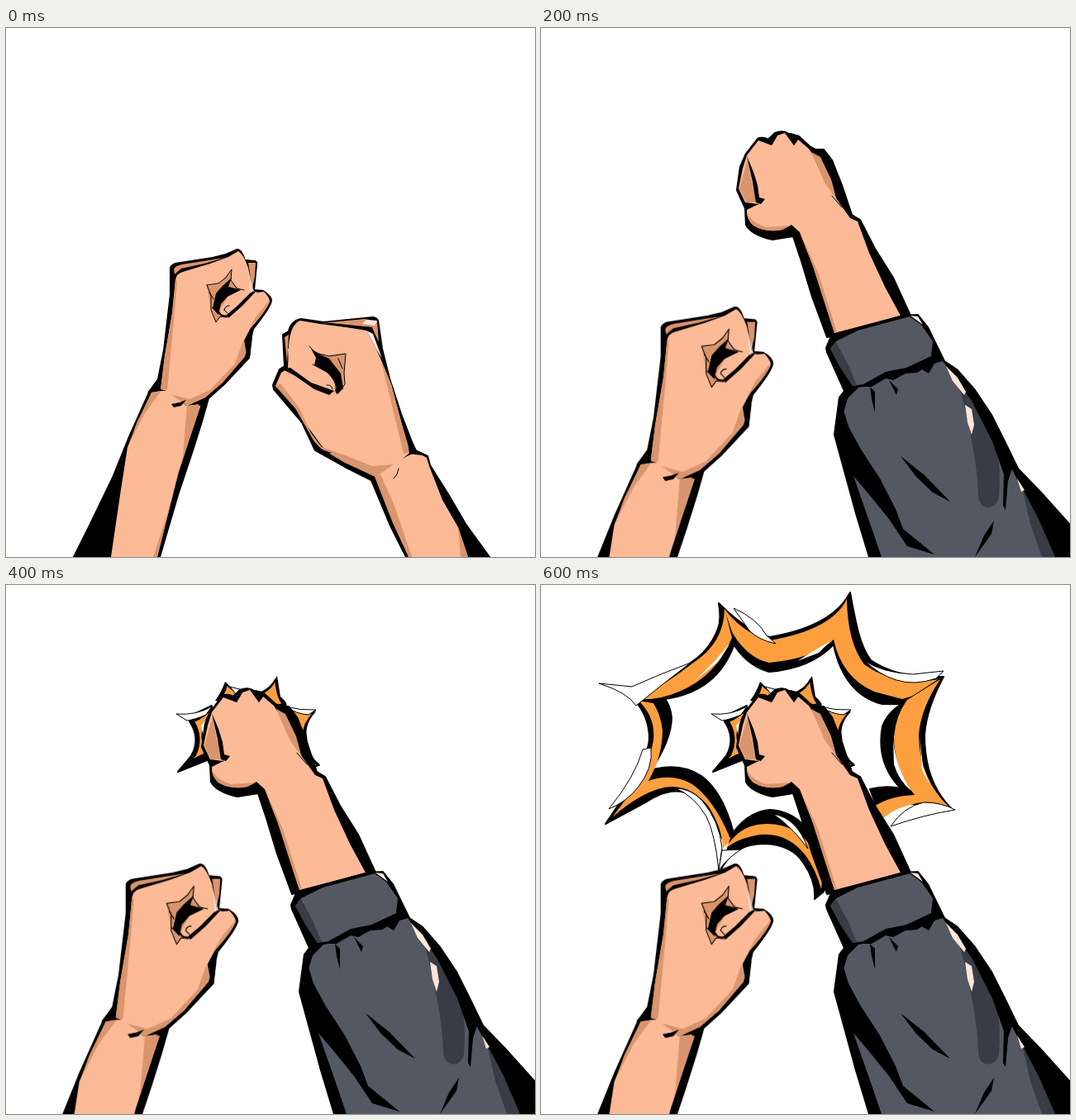
Animation, 640 px wide and 640 px high, one loop 800 ms. Source, as an HTML page:

```html
<!DOCTYPE html>
<html lang="en">
<head>
<meta charset="utf-8">
<title>Punch</title>
<style>
  html, body { margin: 0; width: 100%; height: 100%; overflow: hidden; background: #fff; }
  svg { display: block; width: 100%; height: 100%; }
  .skin { fill: #fdba97; }
  .shade { fill: #d9956d; }
  .cloth { fill: #545863; }
  .dark { fill: #393c45; }
  .shine { fill: #fee6d8; }
  .fire { fill: #fd9f3f; }
  .ink { fill: #000; }
  .body { stroke: #000; stroke-width: 2; stroke-linejoin: round; }
  .line { fill: none; stroke: #000; stroke-width: 2; stroke-linecap: round; stroke-linejoin: round; }
  .thin { stroke-width: 1; }
  .white { fill: #fff; stroke: #000; stroke-width: 1; stroke-linejoin: round; }
  .glint { fill: #fff; }
  #spark .fire { stroke: #000; stroke-width: 2; }
  #left, #guard, #punch, #spark, #blast { animation: 800ms step-end infinite; }
  #left { transform-origin: 0 0; animation-name: drop; }
  #guard { animation-name: guard; }
  #punch { animation-name: punch; }
  #spark { animation-name: spark; }
  #blast { animation-name: blast; }
  @keyframes drop {
    0% { transform: none; }
    25%, 100% { transform: matrix(1.1, 0, 0, 1.1, -73, 43); }
  }
  @keyframes guard { 0% { visibility: visible; } 25%, 100% { visibility: hidden; } }
  @keyframes punch { 0% { visibility: hidden; } 25%, 100% { visibility: visible; } }
  @keyframes spark { 0% { visibility: hidden; } 50%, 100% { visibility: visible; } }
  @keyframes blast { 0% { visibility: hidden; } 75%, 100% { visibility: visible; } }
</style>
</head>
<body>
<svg viewBox="0 0 640 640">

  <g id="blast">
    <!-- top -->
    <path class="ink body" d="M215 22Q220 50 208 70Q199 86 186 95L234 73Q250 98 276 105Q326 101 354 72C362 112 383 137 413 144L437 144L487 111Q433 114 399 91C386 74 381 48 374 9Q353 50 277 63Q250 57 215 22Z"/>
    <path class="fire" d="M370 17Q352 54 277 67Q246 60 221 28Q228 47 231 57Q249 88 276 94Q330 89 354 66Q364 112 403 129L437 138Q459 133 482 114Q428 123 391 96Q371 70 370 17Z"/>
    <path class="white" d="M233 28Q262 41 272 60L284 71Q262 66 252 55Z"/>
    <path class="glint" d="M350 68L336 82L310 92L336 76Z"/>
    <path class="white" d="M392 92Q413 106 450 108L487 104L478 113Q452 122 430 115Q408 108 392 92Z"/>
    <!-- right -->
    <path class="ink body" d="M487 111Q466 150 464 182Q464 238 496 270L440 264L405 266L398 247Q418 242 435 246Q405 215 413 171Q419 154 439 142Z"/>
    <path class="fire" d="M483 114Q459 150 457 182Q458 235 494 269Q470 258 447 266Q420 272 408 290L403 268Q422 255 452 254Q427 224 427 184Q429 158 443 139Z"/>
    <path class="glint" d="M426 187Q429 221 448 249Q433 237 427 217Z"/>
    <path class="glint" d="M458 180L462 220L471 242L461 224Z"/>
    <path class="white" d="M423 292Q439 268 463 263Q485 263 501 272Q463 278 423 292Z"/>
    <!-- left -->
    <path class="ink body" d="M220 27Q215 72 181 94Q147 123 113 139Q131 159 131 186Q130 214 78 289L128 262Q165 238 190 260L222 311L233 300Q220 250 194 231Q168 214 133 224Q158 187 158 160Q156 145 150 138Q214 129 234 71Z"/>
    <path class="fire" d="M222 28Q222 70 183 95Q150 121 115 138Q142 140 167 129Q211 111 231 64Z"/>
    <path class="fire" d="M118 140Q139 160 136 188Q129 228 86 281Q116 255 141 247Q176 236 202 267Q219 293 220 318L230 309Q210 260 183 241Q159 227 130 237Q147 207 147 176Q145 157 136 143Z"/>
    <path class="white" d="M70 119L110 123Q143 108 181 94Q148 119 115 146Q105 130 70 119Z"/>
    <path class="glint" d="M229 70L215 92L186 116L211 91Z"/>
    <path class="white" d="M82 271Q114 232 123 199L133 197Q136 222 117 245Q104 262 82 271Z"/>
    <path class="white" d="M163 246Q185 255 200 280Q211 302 215 346L219 318Q216 286 195 261Q181 246 163 246Z"/>
    <!-- bottom -->
    <path class="ink body" d="M218 344Q234 313 270 313Q304 314 318 337Q333 359 331 380L342 371L342 330Q320 274 277 272Q251 274 232 300Z"/>
    <path class="fire" d="M223 319Q241 289 272 289Q309 288 330 321Q343 344 339 368Q333 345 320 327Q298 299 265 302Q236 307 223 319Z"/>
    <path class="white" d="M215 345L219 321L242 320Q226 330 215 345Z"/>
    <path class="white" d="M281 277Q310 282 323 319Q304 293 281 277Z"/>
  </g>

  <g id="spark">
    <path class="ink body" d="M249 146L224 158L222 165Q236 186 224 207L208 226L243 212Z"/>
    <path class="fire" d="M248 151Q239 160 227 165Q239 185 229 206L215 221Q225 210 242 204L238 189Q235 174 248 153Z"/>
    <path class="white" d="M206 156Q230 158 249 147L242 157Q228 163 219 164Z"/>
    <path class="glint" d="M247 158L241 166L239 184L236 170Z"/>
    <path class="ink" d="M265 117Q261 129 253 140L281 144L285 132Q274 127 265 117Z"/>
    <path class="fire" d="M267 120Q265 130 260 137L279 137L283 131Q273 128 267 120Z"/>
    <path class="white" d="M271 123L290 128L279 133Z"/>
    <path class="ink" d="M328 110Q320 125 306 130L329 151Q349 150 332 135Z"/>
    <path class="fire" d="M326 114Q321 126 309 131L327 146L335 144Q328 136 326 114Z"/>
    <path class="ink" d="M331 145Q354 155 375 152Q361 169 364 183Q366 208 380 217L370 224Z"/>
    <path class="fire" d="M343 150Q361 157 372 155Q359 169 360 182L354 174ZM365 196L371 213L378 218L371 220Z"/>
    <path class="white" d="M338 147Q356 152 375 151L366 157Q351 156 338 147Z"/>
  </g>

  <g id="left">
    <path class="ink body" d="M82 640L101 602L129 544L148 497L173 441L184 425L191 390L199 322L199 290Q200 287 205 285L250 278L266 274L280 268Q285 268 289 281L301 282Q304 283 303 287L300 317L311 318Q321 324 321 330Q320 338 299 364L296 377L294 399L264 431L245 448L237 476L226 511L208 565L186 640Z"/>
    <path class="shade" d="M203 292Q204 288 213 286L264 278L240 285L212 291L204 298ZM293 284L302 284L301 301L298 314Z"/>
    <path class="skin" d="M176 441L194 438L218 457L236 455L221 500L208 540L183 640L127 640L138 565L147 507Z"/>
    <path class="shade" d="M176 441L188 439L168 466L148 505L158 478ZM219 457L236 455L221 500L208 540L183 640L178 640L200 573L214 518Z"/>
    <path class="skin" d="M205 305Q206 297 214 295L247 285L269 277L281 270Q287 273 293 290L298 317L304 320L312 319Q319 326 319 331Q317 339 296 363L288 378L291 395L262 429L241 447L219 457L191 440L187 438L192 397L201 345Z"/>
    <path class="shade" d="M205 304L207 306L203 354L195 438L187 437L192 397L201 345ZM287 378L291 395L262 429L241 447L219 457L199 443L222 449L247 438L277 406ZM319 329Q317 340 296 363L288 376L302 350Z"/>
    <path class="ink" d="M289 379L298 374L295 399L287 404L291 391ZM171 441L184 424L187 437L194 439L182 439Z"/>
    <path class="shade" d="M243 312L257 310L273 293L272 306L284 317L269 324L260 339L262 348L254 355L248 340Z"/>
    <path class="ink" d="M254 321L262 312L273 302L269 313L284 317L268 325L260 334L257 347L250 339Z"/>
    <path class="line thin" d="M243 311L257 309L266 302L273 292L272 305L279 315L288 317M243 311L248 323L248 341L254 356L259 349L267 350M246 320L251 328M249 338L257 346"/>
    <path class="skin" d="M299 316L284 319Q263 329 258 344Q262 351 271 347L297 323Z"/>
    <path class="line" d="M258 344Q260 350 270 348"/>
    <path class="line thin" d="M264 341Q265 336 270 336M264 341L268 345"/>
    <path class="ink" d="M267 347L280 336L298 318L302 319L286 336L269 351Z"/>
    <path class="glint" d="M294 294L300 318L296 321Z" opacity=".6"/>
    <path class="ink" d="M200 455L210 453L218 450L212 457L203 459ZM232 456L244 448L239 458Z"/>
  </g>

  <g id="guard">
    <path class="ink body" d="M323 432L331 413L337 409L335 371L342 367Q345 354 357 352L384 356L444 350Q449 351 450 354L455 388L464 424L478 467L495 511L510 518L513 529L535 564L556 600L585 640L484 640L465 602L442 547L410 531L374 511L358 477L324 437Z"/>
    <path class="shade" d="M337 374L342 371L340 405ZM381 357L434 352L449 355L451 380L443 363L400 358Z"/>
    <path class="skin" d="M447 542L485 518L497 513L509 520L512 530L528 571L547 604L559 640L491 640L472 602Z"/>
    <path class="shade" d="M446 543L453 540L470 578L491 640L487 640L468 599ZM547 604L559 640L550 640Z"/>
    <path class="skin" d="M342 385Q344 358 356 354L380 358L436 365L446 382L456 407L466 431L478 476L488 514L478 523L447 543L414 527L386 511L367 485L350 460L326 433L333 417L341 412Z"/>
    <path class="shade" d="M326 433L332 430L355 460L369 490L382 507L410 517L443 530L469 528L447 543L410 526L376 506L350 460ZM453 400L466 431L478 476L489 513L481 515L470 469Z"/>
    <path class="ink" d="M356 472L369 496L382 510L394 514L385 516L373 510ZM484 485L497 511L511 518L488 515Z"/>
    <path class="ink" d="M383 356L443 362L453 389L457 407L436 366L400 360Z"/>
    <path class="shine" d="M436 353L449 354L446 360L431 358ZM436 366L444 370L455 400L448 389Z"/>
    <path class="shade" d="M371 391L389 397L411 394L408 438L397 441Z"/>
    <path class="ink" d="M369 388L382 396L391 400L405 418L408 436L400 443L390 418L373 408L375 399Z"/>
    <path class="line thin" d="M367 385L374 393L391 397L411 394L409 417L410 431L402 442M402 400L407 412"/>
    <path class="skin" d="M341 388L366 386L373 408L389 417Q402 430 399 438Q393 442 382 437L343 412Z"/>
    <path class="line thin" d="M371 407L388 416Q401 428 399 438M388 432Q394 431 395 437"/>
    <path class="ink" d="M333 412L344 411L369 429L397 439L391 444L373 437L350 421Z"/>
    <path class="line thin" d="M475 533L473 540L469 545"/>
  </g>

  <g id="punch">
    <path class="ink body" d="M237 196L241 168L248 152L262 134Q268 131 275 135L283 127Q293 123 300 128L312 131L325 143L332 147L342 147L352 160L364 190L376 226L386 232L404 267L426 302L447 348L346 374L328 325L315 282L305 252L280 256Q254 250 248 238L247 218Z"/>
    <path class="skin" d="M239 194L244 170L249 154L263 136L279 142L286 130L295 127L306 142L311 135L324 146L333 160L346 184L357 206L374 230L383 234L397 272L416 313L435 348L355 369L344 335L329 288L313 247L303 238L292 244Q272 248 257 239Q248 231 249 220L263 213L247 211Z"/>
    <path class="shade" d="M240 194L250 159L254 181L261 211L248 211ZM249 220Q250 233 272 241L302 239L292 244Q272 248 257 239Q248 231 249 220ZM313 247L329 288L355 369L358 368L335 295ZM327 150L338 156L351 183L358 208L343 187Z"/>
    <path class="ink" d="M249 155L257 174L262 190L264 205L271 207L266 213L260 211L256 186ZM302 127L312 130L311 135L306 142L303 135ZM274 134L284 126L286 130L279 142ZM331 146L342 146L353 160L376 228L366 218L357 205L352 183L341 158Z"/>
    <path class="line thin" d="M247 217L263 213M352 203L364 217"/>

    <path class="ink body" d="M345 387L351 373L384 363L438 348L456 347L468 362L488 403L503 413L525 438L545 468L562 502L577 533L605 562L640 601L640 640L397 640L381 587L355 492L361 447L367 439L346 392Z"/>
    <path class="cloth" d="M350 388L357 379L383 366L446 349L460 359L474 379L472 397L442 411L417 416L390 431L377 433L363 412Z"/>
    <path class="dark" d="M350 388L357 380L371 406L382 432L377 433L363 412Z"/>
    <path class="shine" d="M447 348L456 349L462 359Z"/>
    <path class="cloth" d="M371 448L385 434L400 434L417 424L426 426L441 418L455 417L470 407L486 403L508 429L546 475L566 526L579 552L602 580L622 640L400 640L381 578L358 493L366 465Z"/>
    <path class="dark" d="M582 556L608 595L622 640L606 640L592 600Z"/>
    <path class="ink" d="M356 491L366 462L372 482L386 508L410 545L429 582L438 606L476 637L443 627L421 594L395 562L378 542L400 605L412 640L398 640L380 586Z"/>
    <path class="dark" d="M505 430Q535 466 551 509Q557 533 554 568Q551 580 541 580Q530 579 529 565Q528 516 505 430Z"/>
    <path class="ink" d="M486 403L503 413L530 445L562 502L577 533L605 562L640 601L640 640L622 640L602 594L570 533L565 548L562 583L559 578L560 540L546 500L521 451Z"/>
    <path class="ink" d="M435 518L464 541L495 573L474 562L454 543ZM548 596L545 612L525 640L536 614ZM398 434L404 440L404 465L400 449ZM421 426L432 437L430 444ZM456 410L473 400L487 402L476 406L469 418Z"/>
    <path class="line" d="M377 435L390 433L404 426L417 419L428 420L441 414L457 414L473 403"/>
    <path class="shine" d="M490 409L504 423L514 440L512 444L498 427ZM513 456L521 461L524 480L521 492L516 477ZM576 545L585 559L581 561Z"/>
  </g>
</svg>
</body>
</html>
```
